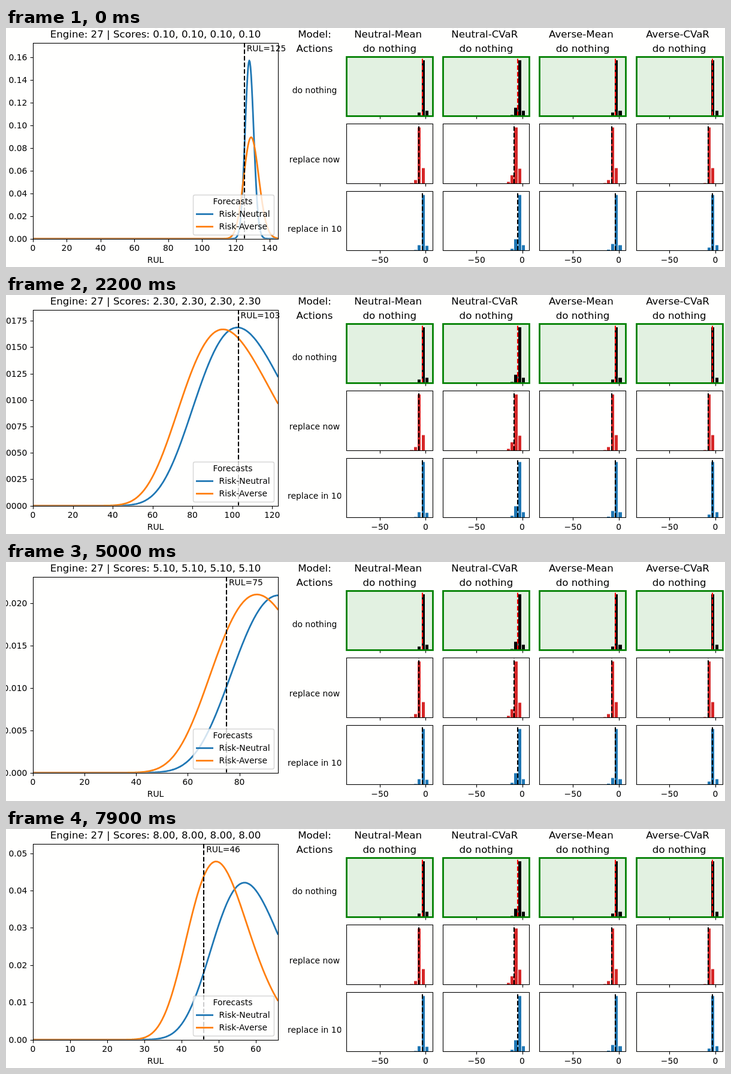
An HTML page for the animation above (8 s loop, 1200x400 px).

```html
<!DOCTYPE html>
<html lang="en">
<head>
<meta charset="utf-8">
<title>Engine RUL forecasts</title>
<style>
  html, body { margin: 0; width: 100%; height: 100%; overflow: hidden; background: #fffffe; }
  svg { display: block; width: 1200px; height: 400px; }
  text { font-family: "DejaVu Sans", sans-serif; font-size: 13.89px; fill: #000; white-space: pre; }
  .big { font-size: 16.67px; }
  .mid { text-anchor: middle; }
  .end { text-anchor: end; }
  .spine { fill: none; stroke: #000; stroke-width: 1.11; }
  .pick { fill: none; stroke: #008000; stroke-width: 2.78; }
  .dash { fill: none; stroke-width: 2.08; stroke-dasharray: 7.71 3.33; }
  .curve { fill: none; stroke-width: 2.78; stroke-linejoin: round; }
</style>
</head>
<body>
<svg id="stage" viewBox="0 0 1200 400">
  <defs>
    <clipPath id="plot"><rect x="45" y="24.6" width="409.1" height="328"/></clipPath>
    <clipPath id="label"><rect x="455" y="310" width="104.5" height="50"/></clipPath>
  </defs>
</svg>
<script>
const svg = document.getElementById('stage');
const BLUE = '#1f77b4', ORANGE = '#ff7f0e', RED = '#d62728';
const LEFT = 45, RIGHT = 454.1, TOP = 24.6, BOTTOM = 352.6;

// thin lines sit on pixel centres, two-pixel lines on pixel edges
const edge = v => Math.floor(v + 0.5);
const snap = v => edge(v) + 0.5;

function add(tag, attrs, parent = svg) {
  const el = document.createElementNS('http://www.w3.org/2000/svg', tag);
  for (const key in attrs) el.setAttribute(key, attrs[key]);
  parent.appendChild(el);
  return el;
}
function text(str, x, y, cls = '', parent = svg) {
  const el = add('text', { x, y, class: cls }, parent);
  el.textContent = str;
  return el;
}
const tick = (d, parent) => add('path', { d, class: 'spine' }, parent);

// ---- forecast plot ----
const plot = add('g', { 'clip-path': 'url(#plot)' });
const blueLine = add('path', { class: 'curve', stroke: BLUE }, plot);
const orangeLine = add('path', { class: 'curve', stroke: ORANGE }, plot);
const rulLine = add('path', { class: 'dash', stroke: '#000' }, plot);
add('rect', { x: snap(LEFT), y: snap(TOP), width: snap(RIGHT) - snap(LEFT),
  height: snap(BOTTOM) - snap(TOP), class: 'spine' });
const ticks = add('g', {});
const rulText = text('', 0, 39);
const title = text('', 249.5, 16, 'big mid');
text('RUL', 249.5, 393, 'mid');

add('rect', { x: 312.5, y: 279.5, width: 135, height: 67, rx: 2.8,
  fill: '#fff', stroke: '#ccc', 'stroke-width': 1.39, opacity: 0.8 });
text('Forecasts', 378.5, 295, 'mid');
[['Risk-Neutral', BLUE, 311.5], ['Risk-Averse', ORANGE, 332.5]].forEach(([name, stroke, y]) => {
  add('path', { d: `M317 ${y}H346`, class: 'curve', stroke });
  text(name, 355.6, y + 4.5);
});

// ---- action grid ----
const models = ['Neutral-Mean ', 'Neutral-CVaR ', 'Averse-Mean ', 'Averse-CVaR '];
const lefts = [0, 1, 2, 3].map(c => 568.15 + 161.15 * c);
const means = [695.1, 854.2, 1017.3, 1178.8];
// bar heights run from right to left
const rows = [
  { name: 'do nothing', base: 109, top: 48.5, bottom: 147.5, fill: '#000', line: '#f00', shift: 0,
    bars: [[9, 93.5, 6], [9, 93.5, 14, 2], [9, 93.5, 6], [9, 93.5]] },
  { name: 'replace now', base: 225, top: 160.5, bottom: 260.5, fill: RED, line: '#000', shift: 6.4,
    bars: [[0, 26, 94, 6, 1], [0, 25, 94, 14, 3], [0, 26, 94, 6, 1], [0, 26, 94, 1]] },
  { name: 'replace in 10', base: 341, top: 273.5, bottom: 372.5, fill: BLUE, line: '#000', shift: 0,
    bars: [[8, 93, 9, 1], [9, 93, 19, 3], [9, 93, 11, 1.5], [9, 93, 5]] }
];

text('Model:', 515, 16, 'big mid');
text('Actions', 515, 40, 'big mid');
rows.forEach((row, r) => {
  const holder = r === 2 ? add('g', { 'clip-path': 'url(#label)' }) : svg;
  text(row.name, r === 2 ? 515.3 : 515, row.base, 'mid', holder);
  lefts.forEach((x, c) => {
    const box = { x: snap(x), y: row.top, width: 144, height: row.bottom - row.top };
    if (r === 0) add('rect', { ...box, fill: '#e2f1e1' });
    row.bars[c].forEach((h, j) => {
      const bx = x + 132 - 6.45 * j;
      if (h) add('rect', { x: edge(bx), y: row.bottom - h, width: edge(bx + 5.16) - edge(bx), height: h, fill: row.fill });
    });
    add('path', { d: `M${edge(means[c] - row.shift)} ${row.bottom}V${row.top}`, class: 'dash', stroke: row.line });
    for (const v of [-50, 0]) {
      const tx = x + 132.2 + v * 1.528;
      tick(`M${snap(tx)} ${row.bottom}v4.86`);
      if (r === 2) text(v ? '\u221250' : '0', tx, 393, 'mid');
    }
    add('rect', { ...box, class: r === 0 ? 'pick' : 'spine' });
  });
});
lefts.forEach((x, c) => {
  text(models[c], x + 72.1, 16, 'big mid');
  text('do nothing', x + 72.1, 40, 'big mid');
});

// ---- forecasts: step, then mode and spread of each log-normal curve ----
const keys = [
  [0, 128, 0.01984, 129.05, 0.03455],
  [8, 128.1, 0.01303, 128.5, 0.0359],
  [22, 102.6, 0.2248, 95.3, 0.2435],
  [42, 105, 0.1602, 104.2, 0.1474],
  [58, 85.1, 0.2415, 69.35, 0.3097],
  [67, 54.92, 0.1928, 45.67, 0.1854],
  [79, 56.96, 0.1641, 49.3, 0.167]
];
function forecast(step) {
  let i = 0;
  while (i < keys.length - 2 && keys[i + 1][0] <= step) i++;
  const a = keys[i], b = keys[i + 1], u = (step - a[0]) / (b[0] - a[0]);
  const mode = n => a[n] + (b[n] - a[n]) * u;
  const spread = n => a[n] * Math.pow(b[n] / a[n], u);
  return [[mode(1), spread(2)], [mode(3), spread(4)]];
}
function density(x, [m, s]) {
  if (x <= 0) return 0;
  const z = Math.log(x / m) / s;
  return Math.exp(-(z * z + s * s) / 2) / (m * s * Math.sqrt(2 * Math.PI));
}
function niceStep(range) {
  const raw = range / 9, mag = Math.pow(10, Math.floor(Math.log10(raw) + 1e-9));
  return mag * [1, 2, 2.5, 5, 10].find(n => n * mag >= raw * 0.9999);
}

function draw(step) {
  const rul = 125 - step, xMax = rul + 20;
  const curves = forecast(step);
  const yMax = 1.1 * Math.max(...curves.map(c => density(Math.min(c[0], xMax), c)));
  const px = v => LEFT + (RIGHT - LEFT) * v / xMax;
  const py = v => BOTTOM - (BOTTOM - TOP) * v / yMax;

  const trace = c => {
    const pts = [];
    for (let i = 0; i <= 400; i++) {
      const v = xMax * i / 400;
      pts.push(px(v).toFixed(2) + ' ' + py(density(v, c)).toFixed(2));
    }
    return 'M' + pts.join('L');
  };
  blueLine.setAttribute('d', trace(curves[0]));
  orangeLine.setAttribute('d', trace(curves[1]));

  rulLine.setAttribute('d', `M${edge(px(rul))} ${BOTTOM}V${TOP}`);
  rulText.setAttribute('x', px(rul) - 0.4);
  rulText.textContent = ' RUL=' + rul;
  const score = ((step + 1) / 10).toFixed(2);
  title.textContent = 'Engine: 27 | Scores: ' + Array(4).fill(score).join(', ');

  ticks.replaceChildren();
  const dx = niceStep(xMax);
  for (let v = 0; v <= xMax; v += dx) {
    tick(`M${snap(px(v))} ${snap(BOTTOM)}v4.86`, ticks);
    text(Math.round(v), px(v), 373, 'mid', ticks);
  }
  const dy = niceStep(yMax);
  let digits = 0;
  while (Math.abs(dy * 10 ** digits - Math.round(dy * 10 ** digits)) > 1e-6) digits++;
  for (let i = 0; i * dy <= yMax; i++) {
    const y = snap(py(i * dy));
    tick(`M${snap(LEFT)} ${y}h-4.86`, ticks);
    text((i * dy).toFixed(digits), 35.3, y + 4.5, 'end', ticks);
  }
}

let shown = -1;
const start = performance.now();
function loop(now) {
  const step = Math.floor(Math.max(0, now - start) / 100) % 80;
  if (step !== shown) draw(shown = step);
  requestAnimationFrame(loop);
}
loop(start);
</script>
</body>
</html>
```
